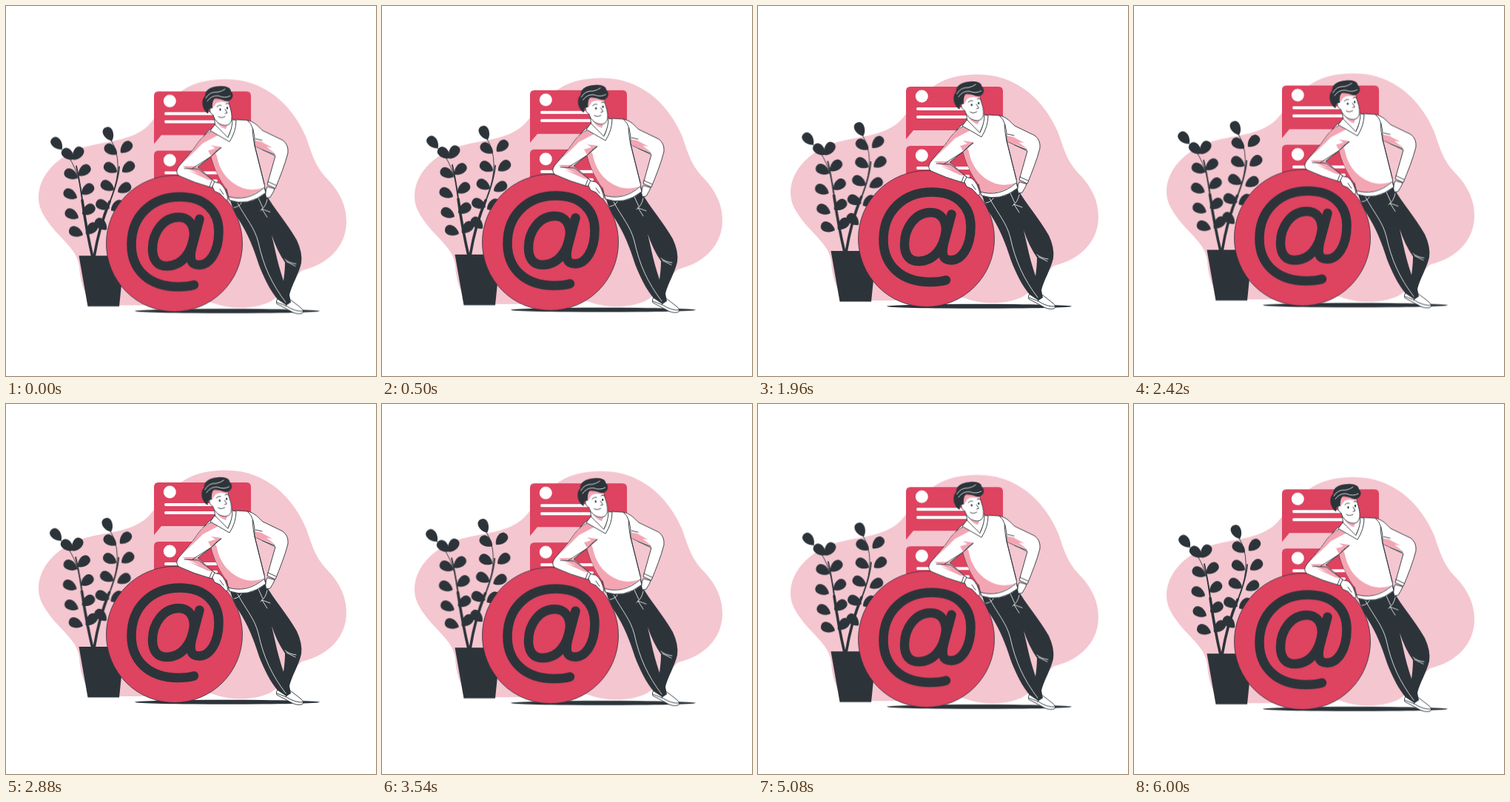
Animation, 500 px wide and 500 px high, one loop 6.04 s. Source, as an HTML page without scripts:

```html
<!DOCTYPE html>
<html lang="en">
<head>
<meta charset="utf-8">
<title>Leaning on the at sign</title>
<style>
  :root { --ink: #2c343a; --red: #de4360; --pink: #f4c6d0; --shade: #f3a5b3; }
  html, body { margin: 0; width: 100%; height: 100%; overflow: hidden; background: #fff; }
  svg { display: block; width: 100%; height: 100%; }
  .ink { fill: var(--ink); }
  .red { fill: var(--red); }
  .pink { fill: var(--pink); }
  .shade { fill: var(--shade); }
  .white { fill: #fff; }
  .skin { fill: #fff; stroke: var(--ink); stroke-width: .9; stroke-linejoin: round; stroke-linecap: round; }
  .line { fill: none; stroke: var(--ink); stroke-width: .9; stroke-linecap: round; stroke-linejoin: round; }
  .seam { fill: none; stroke: #fff; stroke-width: .8; stroke-linecap: round; }
  .row { fill: none; stroke: #fff; stroke-width: 4; stroke-linecap: round; }
  .mark { fill: none; stroke: var(--ink); stroke-width: 12.5; stroke-linecap: round; stroke-linejoin: round; }
  .bob { animation: bob 3.02s linear infinite alternate; }
  .sway { transform-origin: 118px 337px; animation: sway 3.02s ease-in-out infinite alternate; }
  .head { transform-origin: 293px 160px; animation: nod 6.04s ease-in-out infinite; }
  @keyframes bob { from { transform: translateY(.4px); } to { transform: translateY(-9.5px); } }
  @keyframes sway { to { transform: rotate(-.4deg); } }
  @keyframes nod {
    0%, 100% { transform: rotate(0deg); }
    17%, 83% { transform: rotate(-2deg); }
  }
</style>
</head>
<body>
<svg viewBox="0 0 500 500">
  <defs>
    <path id="leaf" class="ink" d="M0 0C5-8 20-10 20 0C20 10 5 8 0 0Z"/>
  </defs>
  <g class="bob">
    <path class="pink" d="M44 258C44 231 66 203 107 190C140 181 174 182 195 158C214 136 222 122 246 109
      C275 95 318 95 346 110C376 125 395 152 406 178C413 199 418 216 432 231C449 248 460 267 460 291
      C460 322 438 348 400 357C386 368 378 386 362 396C344 409 306 411 280 401C250 394 220 404 180 404
      H130C108 400 101 378 99 352C97 330 76 316 61 297C49 281 44 272 44 258Z"/>

    <!-- message cards -->
    <g id="card">
      <path class="red" d="M206 115H325Q331 115 331 121V168Q331 174 325 174H210L200 186V121Q200 115 206 115Z"/>
      <circle class="white" cx="221.300" cy="128" r="8.500"/>
      <path class="row" d="M216 145H284M216 156H284"/>
    </g>
    <use href="#card" y="80"/>

    <ellipse class="ink" cx="299" cy="411.800" rx="125" ry="3"/>

    <!-- plant -->
    <g class="sway">
      <path class="line" d="M75 193Q97 212 103 258M142 181Q160 210 143 258"/>
      <path class="line" style="stroke-width:1.800" d="M95 216C102 245 103 270 109 297M153 217C151 242 139 265 131 291"/>
      <path class="line" style="stroke-width:3.600" d="M103 262Q109 305 117 339M140 264Q126 297 119 339"/>
      <use href="#leaf" transform="translate(75.500 193.500)rotate(-130)"/>
      <use href="#leaf" transform="translate(91.500 207)rotate(-138)"/>
      <use href="#leaf" transform="translate(91.500 207.500)rotate(-57)"/>
      <use href="#leaf" transform="translate(97 232)rotate(-152)"/>
      <use href="#leaf" transform="translate(98 229)rotate(-42)"/>
      <use href="#leaf" transform="translate(96 259)rotate(-152)"/>
      <use href="#leaf" transform="translate(102 254)rotate(-38)"/>
      <use href="#leaf" transform="translate(98 286)rotate(-152)"/>
      <use href="#leaf" transform="translate(103 281)rotate(-35)"/>
      <use href="#leaf" transform="translate(104 309)rotate(-157)"/>
      <use href="#leaf" transform="translate(108 308)rotate(-45)"/>
      <use href="#leaf" transform="translate(143 182)rotate(-115)"/>
      <use href="#leaf" transform="translate(150 200)rotate(-143)"/>
      <use href="#leaf" transform="translate(155 198)rotate(-45)"/>
      <use href="#leaf" transform="translate(150 224)rotate(-148)"/>
      <use href="#leaf" transform="translate(157 224)rotate(-38)"/>
      <use href="#leaf" transform="translate(146 248)rotate(-150)"/>
      <use href="#leaf" transform="translate(151 251)rotate(-30)"/>
      <use href="#leaf" transform="translate(140 273)rotate(-155)"/>
      <use href="#leaf" transform="translate(142 276)rotate(-35)"/>
      <use href="#leaf" transform="translate(136 302)rotate(-135)"/>
    </g>
    <path class="ink" d="M98.500 337H160L153 405.500H110.500Z"/>

    <!-- at sign disc -->
    <circle class="red" cx="227.500" cy="320.500" r="92" stroke="#2c343a" stroke-width=".8"/>
    <path class="mark" d="M254 376.500C247 378.500 241 379 233 379C192 379 169.500 355 169.500 322
      C169.500 284 196 257.500 235 257.500C268 257.500 287.500 276 287.500 304C287.500 332 275 349.500 261 349.500
      C249 349.500 248 341 251 327L261.500 287.500"/>
    <path class="mark" d="M254 309C254 294 246 285 233 285C213 285 198 305 198 328
      C198 343 205 351 217 351C237 351 251 334 254 309Z"/>

    <!-- shoes and trousers -->
    <path class="skin" d="M368 393Q364 399 366 402L383 411Q392 417 400 415Q404 412 398 407L385 397Z"/>
    <path class="line" d="M366 400L379 405Q391 413 402 412M381 399L378 405"/>
    <path class="ink" d="M303 262L350 252C362 273 380 293 393 316Q401 333 399 347C396 361 386 377 383 390
      L385 400L379 404L367 396C357 384 349 368 342 350C334 325 327 308 315 289Q307 277 303 262Z"/>
    <path class="pink" d="M359 309Q366 330 377 346Q377 357 375 371Q368 350 364 331Z"/>
    <path class="seam" d="M313 266C325 288 336 299 341 319C348 351 359 375 378 400M319 264Q316 271 308 272
      M341 259L347 272M353 261Q351 271 344 276M346 274L357 278M346 274L353 285M377 342Q383 347 392 348M379 345L391 351"/>

    <!-- far arm -->
    <path class="skin" d="M353 244Q349 252 352 259L357 258Q361 252 363 247Z"/>
    <path class="skin" d="M326 154C337 156 341 163 347 168L374 181Q382 187 381 198C377 214 370 231 364 246
      L353 241L364 202L335 188Z"/>
    <path class="shade" d="M335 181L351 184L345 183L360 191L352 190L364 199L337 189Z"/>
    <path class="line" d="M363 200L347 194M354 237L365 242M346 181L337 179"/>

    <!-- sweater -->
    <path class="skin" d="M281 163Q269 170 264 181L277 203C282 221 289 234 298 247L302 262
      Q327 271 351 252L349 240L336 188Q337 162 326 154L310 153L298 170Z"/>
    <path class="shade" d="M277 202Q283 194 285 203C289 224 302 239 321 246Q334 250 348 245
      Q325 264 300 257L298 247C289 235 281 219 277 202Z"/>
    <path class="white" d="M300 257Q326 265 349 245L351 252Q328 271 302 262Z"/>
    <path class="line" d="M298 247L302 262Q327 271 351 252L349 245Q326 265 300 257M336 188L349 240M333 166Q334 180 336 188"/>

    <!-- near arm -->
    <path class="skin" d="M280 237L289 239Q297 245 300 260Q298 264 294 258L289 253L282 250L279 244Z"/>
    <path class="skin" d="M277 169C263 175 258 188 250 197L233 217Q228 225 234 229Q253 238 278 245L282 237
      L259 217L277 203L291 191"/>
    <path class="shade" d="M276 170C263 176 258 188 250 198L238 212L255 196L266 185L287 174L279 170Z"/>
    <path class="shade" d="M291 190L277 188L283 192L273 195L277 202Z"/>
    <path class="shade" d="M238 216L257 216L281 236L272 234L246 222L262 227Z"/>
    <path class="line" d="M290 191Q283 196 277 203L252 219M241 219L260 220L282 237M278 236L275 244M289 247L294 254"/>

    <!-- neck and collar -->
    <path class="skin" d="M281 147L283 164L299 179L309 156L302 148Z"/>
    <path class="shade" d="M282 151Q290 162 299 161L297 166Q287 163 282 151Z"/>
    <path class="skin" d="M282 160L276 168L302 183Q311 169 311 154L306 153Q306 165 300 177Z"/>

    <g class="head">
      <path class="skin" d="M278 126L277 136Q273 143 280 147C282 155 289 161 297 161C306 160 306 150 304 141
        L300 126Z"/>
      <path class="shade" d="M279 125L300 126L301 131Q290 127 284 131L279 138Z"/>
      <path class="ink" d="M273 145C266 141 262 128 269 121C269 113 277 108 288 108C297 107 304 110 304 115
        C309 120 306 126 301 128C294 129 290 124 283 124Q278 127 279 138Q275 137 274 140Z"/>
      <path class="seam" d="M270 124Q275 115 286 116Q292 115 296 112M272 128Q278 120 287 121Q296 125 303 121"/>
      <path class="line" d="M285 136Q287 133 291 134M297 132Q299 130 301 132M296 139L299 144L296 145M287 149Q291 152 296 149"/>
      <ellipse class="ink" cx="289.500" cy="139.500" rx="1.100" ry="1.700"/>
      <ellipse class="ink" cx="299" cy="137.500" rx="1.100" ry="1.700"/>
    </g>
  </g>
</svg>
</body>
</html>
```
